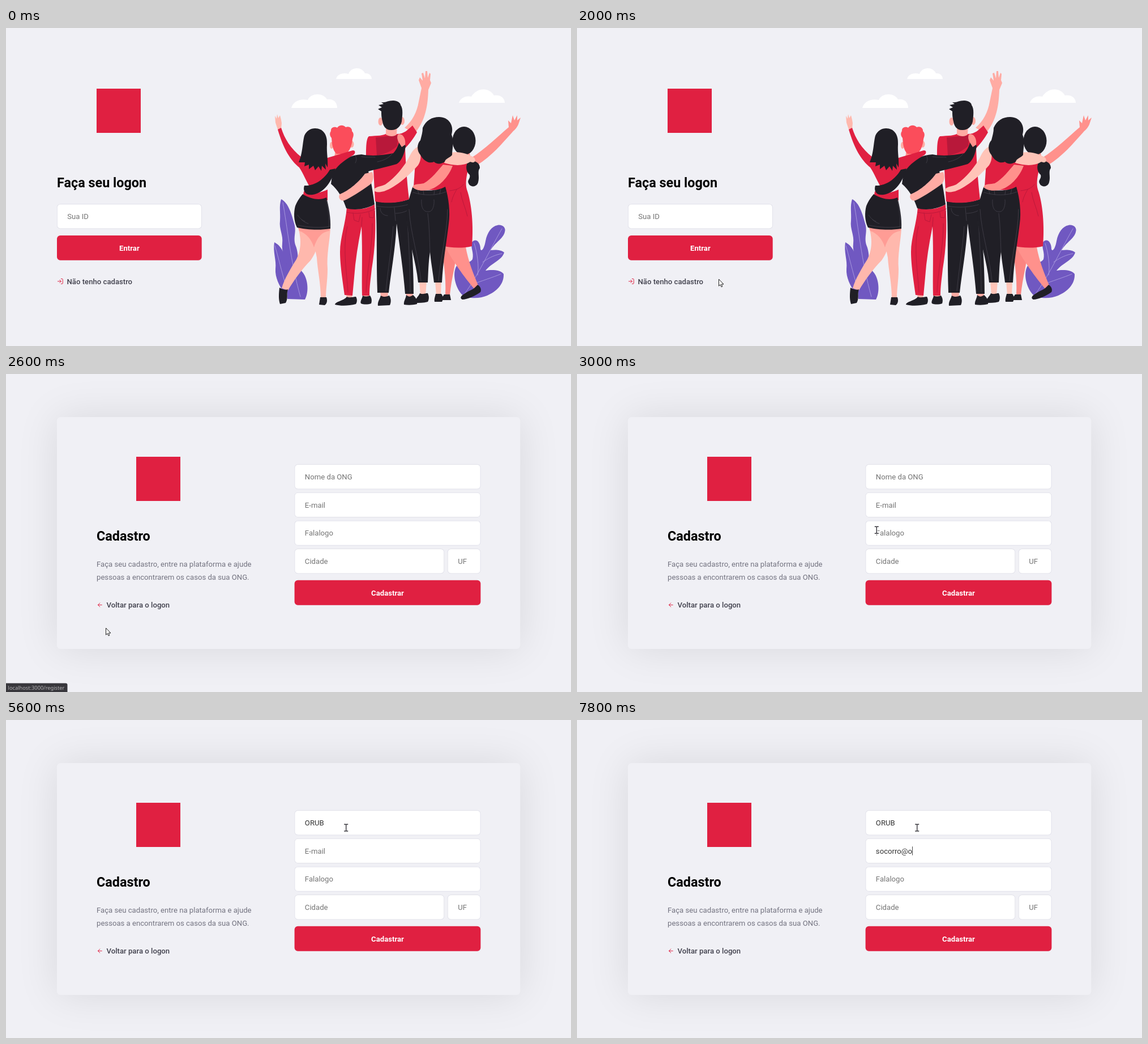
Write an HTML page with a canvas that moves like this. It is 998x561 px and loops after 8000 ms.

```html
<!DOCTYPE html>
<html lang="pt-BR">
<head>
<meta charset="utf-8">
<title>Cadastro</title>
<style>
html, body { margin: 0; width: 100%; height: 100%; overflow: hidden; background: #f0f0f5; }
canvas { display: block; width: 998px; height: 561px; }
</style>
</head>
<body>
<canvas id="stage"></canvas>
<script>
const W = 998, H = 561, LOOP = 8000, FPS = 15;
const canvas = document.getElementById('stage');
const ctx = canvas.getContext('2d');
const dpr = window.devicePixelRatio || 1;
canvas.width = W * dpr;
canvas.height = H * dpr;

const BG = '#f0f0f5', RED = '#e02041', DARK = '#201f26', DEEP = '#b8183a', SEAM = '#44424c';
const PURPLE = '#7058c1', VEIN = '#b3a5e4';
const PALE = '#ffc4b8', SKIN = '#ffb8ad', ROSE = '#ffaba3', CORAL = '#ff918c';
const PX = 998 / 1366;          // the page was laid out 1366 units wide
const BODY = 18 * PX, TITLE = 32 * PX;

function fill(color, d) {
  ctx.fillStyle = color;
  ctx.fill(new Path2D(d));
}

function line(color, width, d) {
  ctx.strokeStyle = color;
  ctx.lineWidth = width;
  ctx.stroke(new Path2D(d));
}

function oval(color, x, y, rx, ry) {
  ctx.fillStyle = color;
  ctx.beginPath();
  ctx.ellipse(x, y, rx, ry, 0, 0, Math.PI * 2);
  ctx.fill();
}

function text(str, x, y, color, weight = 400, size = BODY, align = 'left') {
  ctx.font = `${weight} ${size}px Roboto, sans-serif`;
  ctx.textAlign = align;
  ctx.fillStyle = color;
  ctx.fillText(str, x, y);
}

function rounded(color, x, y, w, h, r = 8 * PX) {
  ctx.fillStyle = color;
  ctx.beginPath();
  ctx.roundRect(x, y, w, h, r);
  ctx.fill();
}

/* ---------- interface parts ---------- */

function field(x, y, w, hint, value = '') {
  const h = 60 * PX;
  rounded('#dcdce6', x, y, w, h);
  rounded('#fff', x + PX, y + PX, w - 2 * PX, h - 2 * PX, 7 * PX);
  text(value || hint, x + 25 * PX, y + 36.5 * PX, value ? '#333' : '#757575');
}

function button(label, x, y, w) {
  rounded(RED, x, y, w, 60 * PX);
  text(label, x + w / 2, y + 36.5 * PX, '#fff', 700, BODY, 'center');
}

function iconLink(label, icon, x, y, alpha = 1) {
  ctx.save();
  ctx.globalAlpha = alpha;
  text(label, x + 24 * PX, y + 4.6, '#41414d', 500);
  ctx.translate(x, y - 8 * PX);
  ctx.scale(16 * PX / 24, 16 * PX / 24);
  line(RED, 2, icon);
  ctx.restore();
}

function badge(x, y) {
  ctx.fillStyle = RED;
  ctx.fillRect(x + 70, y, 78, 78);
}

function statusBar() {
  rounded('#38373c', -4, 545.5, 112.5, 20, 3);
  ctx.font = '9.25px "Noto Sans", sans-serif';
  ctx.textAlign = 'left';
  ctx.fillStyle = '#b4b3b6';
  ctx.fillText('localhost:3000/register', 3.5, 556.5);
}

/* ---------- illustration ---------- */

function clouds() {
  fill('#fff', 'M583 90C585 82 594 78 605 81C609 69 628 67 634 80C642 79 646 85 646 90Z');
  fill('#fff', 'M504 141C507 129 520 124 533 127C539 114 560 114 567 126C578 124 585 131 585 141Z');
  fill('#fff', 'M800 132C803 123 812 119 822 121C832 105 853 104 862 119C874 117 881 124 881 132Z');
}

function plants() {
  fill(PURPLE, 'M486 302C482 315 485 325 484 340C482 355 490 365 488 380C486 395 494 405 494 420C492 432 498 440 497 478L528 479C536 465 533 440 523 430C513 415 518 400 512 385C506 370 514 360 509 345C505 330 499 308 486 302Z');
  fill(PURPLE, 'M474 378C471 395 478 410 476 425C475 440 483 455 490 465L503 466C501 450 497 440 497 425C494 405 490 386 474 378Z');
  line(VEIN, .8, 'M489 308C497 350 502 410 520 474M475 384C484 415 489 440 497 462');
  fill(PURPLE, 'M868 348C876 346 884 352 881 360C878 372 864 378 856 392C864 391 874 391 880 396C876 410 858 414 847 428C856 426 874 426 879 434C880 452 866 465 850 472C836 478 815 478 805 470C792 455 788 430 797 418C806 412 818 417 824 408C827 396 820 388 823 378C829 370 838 376 838 390C840 396 845 388 847 376C850 360 858 350 868 348Z');
  line(VEIN, .8, 'M806 474C830 444 850 400 876 354M833 436C836 420 832 395 827 380M822 453C840 446 860 440 874 434M842 413C855 404 865 400 876 398');
}

function dressWoman() {
  fill(CORAL, 'M822 229C846 214 870 190 888 175L887 163L892 168L895 154L898 163L903 154L903 163L909 158L905 170C902 177 898 180 895 183C876 204 858 226 832 242Z');
  fill('#fb8581', 'M770 386L797 388C796 410 787 440 784 471L776 471C778 440 772 410 770 386Z');
  fill(CORAL, 'M776 386L812 386C816 410 826 435 835 456L827 460C810 440 788 410 776 386Z');
  fill(DARK, 'M833 453C839 456 840 463 838 466C830 472 815 479 806 479C801 477 804 472 808 470C816 464 824 462 828 458Z');
  fill(DARK, 'M774 470L784 470L786 480L767 480Z');
  fill(CORAL, 'M798 215L818 215L822 238L792 238Z');
  fill(RED, 'M784 232C800 230 814 234 818 242C813 262 811 274 814 285C823 310 826 350 823 385C806 389 785 388 768 384L770 290Z');
  line(DEEP, .9, 'M784 287C794 286 803 283 808 276M803 290C805 304 812 318 815 332M796 285C792 292 788 300 787 307');
  oval(DARK, 809, 199, 20.5, 25);
  fill(DARK, 'M816 236C830 232 837 239 837 247C832 253 837 262 834 272C832 281 820 282 817 274C814 268 821 266 819 259C813 254 811 244 816 236Z');
}

function curlyWoman() {
  fill(PALE, 'M730 446H743L741 472H732ZM758 446H769L768 472H760Z');
  fill(DARK, 'M731 468C738 471 742 467 745 468C748 474 747 480 745 483C738 485 729 485 722 485C721 479 728 475 731 468ZM759 469L769 469C773 474 772 480 770 483L757 483C756 478 758 474 759 469Z');
  fill(RED, 'M724 222C735 222 770 230 784 238L778 283C760 288 735 286 720 280Z');
  fill(DARK, 'M718 281C735 288 760 289 776 280C782 300 785 325 782 345C778 380 772 410 770 449L756 449C754 430 750 410 749 395C746 415 746 430 745 449L728 449C724 410 712 380 708 340C706 320 712 300 718 281Z');
  line(SEAM, .8, 'M719 290C738 296 760 296 777 289M727 283L729 293M737 286L738 294M757 286L756 294M768 284L766 293M734 303C733 318 738 325 747 324C754 324 757 312 756 303M745 327C748 350 748 372 749 396M712 320C714 360 729 405 733 446M780 320C779 365 767 405 764 446');
  fill(CORAL, 'M789 243C782 262 765 282 745 286C732 288 722 286 718 280C722 274 730 276 738 274C752 266 764 250 772 241Z');
  fill(PALE, 'M776 222C795 216 812 220 826 228C832 233 828 240 820 236C808 244 790 243 774 238Z');
  fill(PALE, 'M728 209C734 222 734 232 728 242C714 258 690 280 668 288C660 290 652 291 649 285C655 279 662 280 670 276C688 264 704 243 712 228C717 217 722 212 728 209Z');
  fill(DARK, 'M765 157C782 157 792 172 787 188C792 200 788 213 788 224C783 230 776 230 775 236C768 241 760 240 756 236C748 240 738 235 732 224C725 216 726 204 732 198C734 190 736 184 736 176C742 163 752 157 765 157Z');
}

function tallMan() {
  fill(ROSE, 'M661 466H675L674 478H663ZM706 466H719L718 478H708Z');
  fill(DARK, 'M662 472C668 476 674 473 677 472C681 478 680 485 678 489L657 490C656 483 660 479 662 472ZM707 471C712 476 716 473 719 471C725 476 727 482 726 487C718 489 710 489 703 488C702 482 706 478 707 471Z');
  fill(DARK, 'M653 305C670 310 695 308 712 302L714 340C718 400 720 430 720 469L705 469C702 430 696 390 690 345C688 390 680 430 676 467L656 467C654 410 656 360 653 305Z');
  line(SEAM, .8, 'M654 314C674 318 694 316 712 311M661 318C661 326 667 331 674 331M686 317L688 340M688 327C697 327 707 324 712 320M684 350C681 390 674 430 671 464M709 340C712 390 714 430 714 466');
  fill(ROSE, 'M704 176C718 164 726 148 729 130L734 106L729 92L731 87L736 93L734 80L737 79L740 89L741 76L744 76L745 88L748 79L750 81L749 92L751 97L746 109C745 135 742 162 722 186Z');
  fill(RED, 'M641 191C655 190 668 190 672 186C680 190 686 190 690 187C704 187 710 179 718 172L726 184C720 195 712 205 705 212C706 235 708 270 712 302C695 309 670 310 652 306C651 290 650 265 648 232L636 228C636 212 636 195 641 191Z');
  fill(DEEP, 'M653 193L693 189L691 208C680 218 670 222 655 225Z');
  fill(ROSE, 'M671 170L691 170L690 188C685 192 678 192 671 188Z');
  oval(ROSE, 661.5, 165, 4, 7);
  oval(ROSE, 700, 164, 4, 7);
  fill(DARK, 'M663 147L657 143L664 140L658 136L667 134L663 131C671 132 674 128 684 128C691 128 697 132 697 136C702 143 700 155 699 165C697 175 688 181 680 180C670 180 666 172 665 165C663 157 663 152 663 147Z');
}

function redHairedMan() {
  fill(ROSE, 'M600 468H612L611 478H603ZM630 468H642L640 476H632Z');
  fill(DARK, 'M602 474C608 477 613 474 618 474C621 479 620 484 618 487C606 490 592 491 581 488C582 482 596 482 602 474ZM630 472C635 475 640 473 643 472C647 478 646 483 645 486C639 488 632 488 627 486C625 482 629 478 630 472Z');
  fill(RED, 'M602 316C618 322 638 320 651 311C654 350 652 390 646 425C644 445 642 455 642 472L629 472C628 440 630 400 628 350C622 380 617 410 615 440L612 472L598 471C596 455 590 420 590 395C590 370 600 345 602 316Z');
  line(DEEP, .9, 'M602 325C618 329 638 327 652 319M613 326L615 339L623 342L626 329M641 325L642 334L649 335L651 323M628 350L629 334M603 350C594 385 602 430 604 466M647 345C647 390 637 430 636 466');
  fill(CORAL, 'M583 208H603L606 228H580Z');
  oval(ROSE, 610.5, 205, 4, 6);
  oval(ROSE, 575, 207, 3, 6);
  fill('#fb4d5b', 'M575 194C570 188 573 183 574 182C573 175 581 173 585 176C589 170 597 171 600 175C607 172 612 178 611 182C616 187 613 192 612 196C611 207 607 218 600 222L584 222C576 215 576 203 575 194Z');
  fill(DARK, 'M578 246C592 232 610 224 628 223C650 227 665 224 684 221C690 215 694 205 697 193L706 208C704 222 698 236 690 240C668 246 650 250 640 253C645 268 648 290 651 311C636 320 615 322 601 318C595 300 586 285 574 275Z');
  line(SEAM, .8, 'M617 225C620 230 619 234 617 238M682 222C676 230 666 234 656 236M628 227C640 229 646 227 652 228');
  fill(CORAL, 'M692 188C700 184 707 195 705 206L699 210C694 202 689 196 692 188Z');
  fill(ROSE, 'M647 254C651 264 648 273 642 277C625 289 608 300 598 304C591 307 585 298 590 293C606 287 625 270 634 257Z');
}

function skirtWoman() {
  fill(SKIN, 'M543 354L573 354C572 375 566 400 568 425C568 445 565 460 565 477L556 477C556 450 550 425 549 405C546 390 543 375 543 354Z');
  fill(SKIN, 'M516 352L556 355C554 378 548 396 538 410C524 424 509 444 498 463L487 459C492 442 503 424 513 408C520 394 523 376 516 352Z');
  fill('#ff9c95', 'M516 352L572 354L571 358C556 360 549 372 544 387C540 373 530 362 518 358Z');
  fill(DARK, 'M483 458C488 461 494 463 498 461C495 469 499 476 494 485L484 487C481 478 482 468 483 458ZM555 475L566 475C568 481 567 486 563 489L553 488Z');
  fill(SKIN, 'M480 179L476 167L475 155L478 160L479 152L481 159L484 154L486 162L487 168L486 178Z');
  fill(RED, 'M480 179L486 176C492 195 502 212 522 228C535 234 558 232 568 229L612 216C619 215 617 223 612 225C600 232 588 240 580 252C570 268 555 278 537 281C530 270 526 258 518 246C502 233 490 213 480 179Z');
  fill(RED, 'M526 288C540 294 556 291 568 285L568 304L524 301Z');
  fill(DARK, 'M524 293C540 303 555 304 566 299C570 315 574 335 573 354C555 357 530 356 514 352C508 340 508 325 511 314C515 304 520 298 524 293Z');
  line(SEAM, .8, 'M516 348C535 352 555 353 572 350M566 303C570 320 571 336 571 350M522 338C526 342 530 344 534 345M515 330C520 337 524 340 528 341');
  fill(DARK, 'M582 248C576 270 562 291 542 294C528 296 524 287 527 278C545 279 562 267 572 250Z');
  fill(DARK, 'M546 177C560 177 568 188 567 205C566 220 569 232 568 246L564 239L565 250L558 243L557 252L552 244L546 251L543 243L535 249L535 241L527 244L528 237L517 237C524 222 524 200 527 190C531 181 538 177 546 177Z');
}

/* ---------- pages ---------- */

function logonPage(t) {
  badge(90, 107);
  text('Faça seu logon', 90, 281.2, '#000', 700, TITLE);
  field(90, 310.5, 350 * PX, 'Sua ID');
  button('Entrar', 90, 366, 350 * PX);
  const hover = Math.min(1, Math.max(0, (t - 2100) / 200));
  iconLink('Não tenho cadastro',
    'M15 3h4a2 2 0 0 1 2 2v14a2 2 0 0 1-2 2h-4M10 17l5-5-5-5M15 12H3', 90, 446.9, 1 - .2 * hover);
  clouds();
  plants();
  dressWoman();
  tallMan();
  curlyWoman();
  redHairedMan();
  skirtWoman();
}

// [time, letters in the name, letters in the e-mail (-1: not focused yet)]
const KEYS = [
  [3400, 0, -1], [4130, 1, -1], [4270, 2, -1], [4600, 4, -1],
  [5000, 4, 0], [5730, 4, 1], [5870, 4, 2], [6000, 4, 3], [6200, 4, 4],
  [6400, 4, 5], [6600, 4, 6], [6800, 4, 7], [7530, 4, 8], [7730, 4, 9]
];

function formPage(t) {
  ctx.save();
  ctx.shadowColor = 'rgba(0,0,0,.1)';
  ctx.shadowBlur = 100 * PX * dpr;
  rounded(BG, 90, 76, 1120 * PX, 409);
  ctx.restore();

  badge(160, 146);
  text('Cadastro', 160, 294.4, '#000', 700, TITLE);
  text('Faça seu cadastro, entre na plataforma e ajude', 160, 340, '#737380');
  text('pessoas a encontrarem os casos da sua ONG.', 160, 363.4, '#737380');
  iconLink('Voltar para o logon', 'M19 12H5M12 19l-7-7 7-7', 160, 407.4);

  const key = KEYS.filter(k => k[0] <= t + 4).pop();
  const [at, nameLen, mailLen] = key || [0, 0, -1];
  const name = 'ORUB'.slice(0, nameLen);
  const mail = 'socorro@o'.slice(0, Math.max(0, mailLen));
  const x = 509.6, y = 159.3, step = 68 * PX, wide = 450 * PX;
  field(x, y, wide, 'Nome da ONG', name);
  field(x, y + step, wide, 'E-mail', mail);
  field(x, y + 2 * step, wide, 'Falalogo');
  field(x, y + 3 * step, 362 * PX, 'Cidade');
  field(x + 370 * PX, y + 3 * step, 80 * PX, 'UF');
  button('Cadastrar', x, y + 280 * PX, wide);

  if (key && Math.floor((t - at) / 560) % 2 === 0) {
    const inMail = mailLen >= 0;
    ctx.font = `400 ${BODY}px Roboto, sans-serif`;
    const end = x + 25 * PX + ctx.measureText(inMail ? mail : name).width;
    ctx.fillStyle = '#333';
    ctx.fillRect(end, y + (inMail ? step : 0) + 30 * PX - 7.7, .9, 15.4);
  }
}

/* ---------- pointer ---------- */

const PATH = [
  [270, 922, 248], [470, 800, 340], [700, 680, 388], [900, 590, 372], [1070, 528, 333],
  [1130, 521, 332], [1333, 521, 332], [1400, 511, 326], [1530, 470, 321], [1800, 362, 412],
  [2000, 250, 443], [2130, 190, 446], [2200, 178, 446], [2530, 178, 447], [2600, 176, 448],
  [2670, 177, 447], [2800, 290, 420], [2930, 470, 310], [3070, 588.5, 240.5],
  [3130, 596, 212], [3200, 600.7, 190]
];

function pointerAt(t) {
  const i = PATH.findIndex(p => p[0] > t);
  if (i < 0) return PATH[PATH.length - 1].slice(1);
  const [t0, x0, y0] = PATH[i - 1], [t1, x1, y1] = PATH[i];
  const k = (t - t0) / (t1 - t0);
  return [x0 + (x1 - x0) * k, y0 + (y1 - y0) * k];
}

function pointer(t) {
  if (t < 270) return;
  const [x, y] = pointerAt(t);
  ctx.save();
  ctx.translate(x, y);
  if (t > 2960) {
    const beam = 'M-3-6H-1Q0-6 0-5V5Q0 6-1 6H-3M3-6H1Q0-6 0-5V5Q0 6 1 6H3';
    line('#fff', 3, beam);
    line('#35343a', 1.4, beam);
  } else if (t > 2100 && t < 2595) {
    const hand = 'M-1.5 1Q0-.5 1 1V4.5L5.5 5Q7 5.2 7 7V9.5L5.5 13H-2.2L-4.5 9Q-4.5 7-2.8 7L-1.5 8Z';
    fill('#fff', hand);
    line('#222', 1, hand);
  } else {
    const arrow = 'M.5.5V12.2L3.2 9.7L5 13.8L6.9 13L5.1 9H8.6Z';
    fill('#fff', arrow);
    line('#222', 1, arrow);
  }
  ctx.restore();
}

/* ---------- loop ---------- */

function draw(t) {
  ctx.setTransform(dpr, 0, 0, dpr, 0, 0);
  ctx.lineCap = ctx.lineJoin = 'round';
  ctx.fillStyle = BG;
  ctx.fillRect(0, 0, W, H);
  if (t < 2595) logonPage(t); else formPage(t);
  if (t > 2320 && t < 2720) statusBar();
  pointer(t);
}

let shown = -1;
const start = performance.now();
function tick() {
  const t = Math.max(0, performance.now() - start) % LOOP;
  const step = Math.floor((t + 4) * FPS / 1000) % (LOOP * FPS / 1000);
  if (step !== shown) {
    shown = step;
    draw(step * 1000 / FPS);
  }
  requestAnimationFrame(tick);
}
tick();
</script>
</body>
</html>
```
